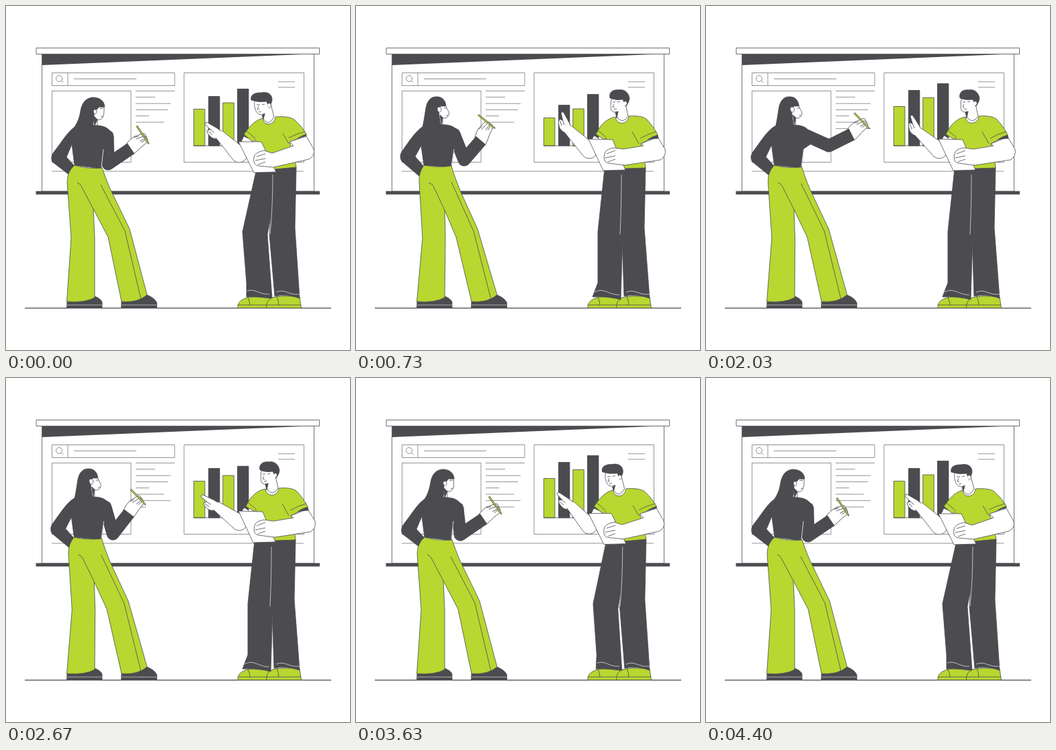
An HTML page with a canvas that plays this animation: 512x512 px, repeating every 4730 ms.

```html
<!DOCTYPE html>
<html lang="en">
<head>
<meta charset="utf-8">
<title>Presentation</title>
<style>
html, body { margin: 0; width: 100%; height: 100%; overflow: hidden; background: #fff; }
canvas { display: block; width: 100vw; height: 100vh; }
</style>
</head>
<body>
<canvas id="stage" width="512" height="512"></canvas>
<script>
const ctx = document.getElementById('stage').getContext('2d');
const LOOP = 4730, END = 4400;
const DARK = '#4b4b50', GREEN = '#b8d730', WHITE = '#fff';
const NUMBER = /-?[\d.]+/g;

const clamp = v => Math.max(0, Math.min(1, v));
const ease = v => { v = clamp(v); return v * v * (3 - 2 * v); };
const lerp = (a, b, w) => a + (b - a) * w;
const radians = degrees => degrees * Math.PI / 180;

// Each key is [time, ...values]; values ease from one key to the next.
function at(keys, t) {
  let i = 0;
  while (i < keys.length - 2 && t >= keys[i + 1][0]) i++;
  const a = keys[i], b = keys[i + 1], w = ease((t - a[0]) / (b[0] - a[0]));
  return a.slice(1).map((v, n) => lerp(v, b[n + 1], w));
}

// Blends two path strings of the same structure.
function blend(a, b, w) {
  const ends = b.match(NUMBER);
  let i = 0;
  return a.replace(NUMBER, v => lerp(+v, +ends[i++], w).toFixed(3));
}

function draw(path, fill, stroke = DARK, width = 0.8) {
  const p = new Path2D(path);
  if (fill) { ctx.fillStyle = fill; ctx.fill(p); }
  if (stroke) { ctx.strokeStyle = stroke; ctx.lineWidth = width; ctx.stroke(p); }
}

const line = (x1, y1, x2, y2) => draw(`M${x1} ${y1}L${x2} ${y2}`, null);
const box = (x1, y1, x2, y2, fill) => draw(`M${x1} ${y1}H${x2}V${y2}H${x1}Z`, fill);

function inFrame(x, y, degrees, paint) {
  ctx.save();
  ctx.translate(x, y);
  ctx.rotate(radians(degrees));
  paint();
  ctx.restore();
}

const BARS = [
  { x: 279.5, mid: 153.5, low: 166.5, high: 149.5, drop: 540, fill: GREEN },
  { x: 301.5, mid: 134.5, low: 147.5, high: 125.5, drop: 530, fill: DARK },
  { x: 322.8, mid: 144, low: 153, high: 136.5, drop: 430, fill: GREEN },
  { x: 344.5, mid: 123.5, low: 131.5, high: 115.5, drop: 300, fill: DARK }
];

const WRITER = [ // elbow, wrist, hand angle, pen angle
  [0, 152, 235, 186, 212, -39, 56],
  [30, 152, 235, 186, 212, -39, 56],
  [640, 161, 229, 186, 200, -65, 39],
  [1270, 161, 229, 185, 199, -65, 38],
  [2030, 183, 208, 217, 191, -43, 46],
  [2640, 159, 232, 183, 201, -51, 46],
  [3180, 178, 217, 209, 200, -43, 48],
  [3700, 154, 234, 189, 210, -39, 55],
  [4270, 152, 235, 186, 212, -39, 56]
];

const POINTER = [ // fingertip, hand angle
  [0, 297, 174, -140],
  [30, 297, 174, -140],
  [700, 307, 158, -108],
  [1270, 292, 167, -135],
  [1980, 306, 163, -112],
  [2670, 291, 175, -145],
  [3600, 300, 171, -137],
  [4400, 297, 174, -140]
];

const LEAN = [[30, 0], [680, 1], [1270, 1], [2030, 0.45], [2670, 0.65], [3750, 0]];

function penTip([, , x, y, angle]) {
  const a = radians(angle + 25);
  return [x + 27.5 * Math.cos(a), y + 27.5 * Math.sin(a)];
}

function screen(t) {
  box(53.5, 71, 458.5, 276, WHITE);
  draw('M54 72H440L54 88Z', DARK, null);
  box(45, 62.5, 466.5, 71.5, WHITE);
  draw('M44.5 275.6H467V280.5H44.5Z', DARK, null);
  ctx.globalAlpha = 0.75;
  box(68.5, 99.5, 251, 118.5);
  line(92, 99.5, 92, 118.5);
  draw('M83.5 108A4.5 4.5 0 1 1 74.5 108A4.5 4.5 0 1 1 83.5 108M82.3 111.2L85.5 114', null);
  line(101, 108.5, 194, 108.5);
  box(68.5, 126.5, 186, 232.5);
  box(265, 99.5, 443.5, 232.5);
  line(68, 246, 443, 246);
  line(405, 112.8, 430, 112.8);
  line(405, 121, 430, 121);

  const [tipX] = penTip(at(WRITER, t));
  const written = (from, to, end) => t < from ? 193 : t < to ? Math.min(end, tipX) : end;
  const ends = [251, 222, 245, 241, 213, 235.5, written(1270, 2030, 245), written(2670, 3180, 235.5)];
  const rows = [126.5, 135.7, 145.2, 154.5, 163.6, 173, 182.4, 192];
  rows.forEach((y, i) => { if (ends[i] > 193) line(193, y, ends[i], y); });
  ctx.globalAlpha = 1;

  BARS.forEach((b, i) => {
    const [top] = at([
      [0, b.mid], [b.drop, b.mid], [b.drop + 190, b.low], [850 + 20 * i, b.low],
      [1200, b.mid], [1270, b.mid], [1420, b.high], [2030, b.high],
      [2100 + 30 * i, b.mid], [2200, b.mid]
    ], t % 2200);
    box(b.x, top, b.x + 16.5, 208, b.fill);
  });
  line(279, 208, 361, 208);
}

function womanHead(turn) {
  const part = (a, b, ...style) => draw(blend(a, b, turn), ...style);
  part('M147 150C146 140 138 136 129 136C118 137 113 145 111 156C109 168 106 176 96 188L128 182L133 160L138 150Z',
       'M134 149C133 139 127 135 120 135C111 135 106 141 104 152C102 164 101 174 97 188L125 182L128 162L126 149Z', DARK);
  part('M139 150L146 151C146 155 146 160 145 163C144 168 140 170 136 169L136 180L131 180L131 158Z',
       'M126 149L134 149C135 153 140 159 138 162C136 167 132 168 129 166L129 179L126 179L123 157Z', WHITE);
  part('M136 169L131 164L132 178Z', 'M129 166L125 162L127 177Z', DARK);
  part('M135 157C135 153 130 153 130 157C131 162 135 161 135 157', 'M127 154C127 149 120 149 121 154C122 160 127 159 127 154', WHITE);
  part('M139 152L144 153M141 165L144 164', 'M131 152L135 152M134 164L137 162', null);
}

function woman(t, turn) {
  const [lean] = at(LEAN, Math.max(t, 30));
  const part = (a, b, ...style) => draw(blend(a, b, lean), ...style);
  draw('M91 439Q116 442 132 432Q142 436 143 441V449.5H90.5Z', DARK);
  draw('M172 439Q196 442 210 430Q222 435 224.5 442V449.5H171.5Z', DARK);
  draw('M91 445H143M172 445H224', null, '#ddd', 0.7);

  inFrame(8 * Math.max(0, turn - lean), 0, 0, () => womanHead(turn));
  part('M104 179C112 176 125 177 138 178C148 179 155 183 158 192L158 205L145 213L142 242L102 237L98 206L90 225L102 238L95 252L69 232Q66 225 70 219C85 200 92 186 104 179Z',
       'M102 178C110 175 122 176 135 177C145 178 150 183 154 190L156 204L146 212L142 240L101 237L97 208L88 224L101 239L95 254L68 231Q64 224 68 217C80 200 90 184 102 178Z', DARK);
  part('M102 237Q122 243 143 241C147 252 151 263 154 270L184 332L210 430Q196 442 172 440L152 344L130 302L132 345L132 434Q118 442 90.5 440L97 345L91 262Q91 246 102 237Z',
       'M101 237Q122 241 142 238C146 252 150 262 156 277L181 332L210 430Q196 442 172 440L149 344L132 304L133 345L132 434Q118 442 90.5 440L99 345L94 262Q93 248 101 237Z', GREEN);
  part('M141 266L177 335L201 437M106 263Q110 264 112 268L130 302',
       'M142 262L175 335L201 437M108 263Q113 264 115 268L132 304', null);

  const arm = at(WRITER, t);
  const [ex, ey, wx, wy, angle, penAngle] = arm;
  inFrame(wx, wy, angle, () => {
    draw('M-3 -9Q8 -12 15 -10.5L28 -6Q31 -4 29 -1L28 5Q25 9 20 8L12 8Q6 9 -3 9Z', WHITE);
    draw('M15 -6L27 -2Q30 0 27 2L17 0M18 3L27 4M14 -10L20 -7', null);
  });
  inFrame(...penTip(arm), penAngle, () => draw('M-32 -1H-2L0 0L-2 1H-32Z', GREEN));

  const sx = lerp(151, 146, lean), sy = lerp(194, 191, lean);
  draw(`M${sx} ${sy}L${ex} ${ey}L${wx} ${wy}`, null, DARK, 19);
  ctx.beginPath();
  ctx.arc(sx, sy, 9.5, 0, 2 * Math.PI);
  ctx.fillStyle = DARK;
  ctx.fill();
  part('M145 213L142 240', 'M146 213L142 238', null, WHITE);
}

function pointingArm(t, turn) {
  const [tx, ty, angle] = at(POINTER, t);
  const a = radians(angle);
  const wx = tx - 26 * Math.cos(a), wy = ty - 26 * Math.sin(a);
  const ex = 347, ey = lerp(221, 215, turn);
  const dir = Math.atan2(wy - ey, wx - ex);
  const nx = -Math.sin(dir), ny = Math.cos(dir);

  draw(`M362 198L${ex + 4} ${ey}`, null, DARK, 19);
  draw(`M362 198L${ex + 4} ${ey}`, null, WHITE, 17.5);
  inFrame(wx, wy, angle, () => {
    draw('M-4 6L8 5L25 2Q28 0 25 -2L14 -3L17 -6Q17 -9 13 -10L7 -11Q1 -11 -4 -6Z', WHITE);
    draw('M14 -3L7 -3M15 -7L7 -7', null);
  });
  ctx.beginPath();
  ctx.moveTo(wx + nx * 7, wy + ny * 7);
  ctx.arc(ex, ey, 12, dir + Math.PI / 2, dir - Math.PI / 2);
  ctx.lineTo(wx - nx * 7, wy - ny * 7);
  ctx.fillStyle = WHITE;
  ctx.strokeStyle = DARK;
  ctx.lineWidth = 0.8;
  ctx.fill();
  ctx.stroke();
}

function man(t, turn) {
  const part = (a, b, ...style) => draw(blend(a, b, turn), ...style);
  draw('M345 449.5Q344 440 354 436Q362 431 376 433L394 435Q398 440 391 449.5Z', GREEN);
  draw('M387.5 449.5Q387 438 396 434Q410 430 437 433L439.5 449.5Z', GREEN);
  draw('M345 445H439M360 434Q363 439 363 445M403 433Q406 438 406 445', null);

  part('M373 242L352 336L358 412L358 433Q376 432 396 435L389 340L394 315L396 244Z',
       'M370 242L360 336L360 412L352 433Q376 432 394 437L396 372L396 320L396 244Z', DARK);
  part('M392 242L394 315L392 340L400 432Q418 428 437 435L430 330L432 240Z',
       'M394 242L396 315L396 345L399 432Q418 428 437 435L429 330L431 240Z', DARK);
  part('M397 251Q397 300 393 340', 'M395 251Q395 300 393 340', null, '#ddd');
  part('M359 424C372 420 376 430 392 429M402 426C415 420 420 431 437 429',
       'M355 426C368 418 376 430 392 430M402 426C415 420 420 431 437 429', null, '#ddd');

  pointingArm(t, turn);

  part('M382 167C384 180 400 178 401 165C412 164 424 165 429 169C437 176 444 185 447 191L422 203L427 215L432 240L400 243L376 215L371 199L367 202L354 191C362 180 370 170 382 167Z',
       'M386 165C388 178 405 177 406 164C416 163 427 164 432 168C439 175 446 185 449 192L424 205L428 217L431 241L400 242L376 213L372 196L370 199L357 191C362 182 368 169 386 165Z', GREEN);
  part('M421 196Q433 190 445 187M412 190L421 205M358 186L371 197', 'M423 197Q435 190 447 187M411 187L421 205M361 186L372 195', null);

  part('M370 141C369 150 371 157 376 161Q380 163 385 160L383 168Q391 180 399 165L395 150L393 138L380 136Z',
       'M380 139C379 146 379 152 380 155Q384 160 390 157L388 165Q397 177 405 164L402 150L403 138L390 134Z', WHITE);
  part('M385 160L381 163L383 168Z', 'M390 157L386 158L388 167Z', DARK);
  part('M365 140C363 131 372 129 380 129C390 127 396 132 396 139C396 145 393 146 391 151L388 142Q376 144 365 140Z',
       'M378 137C376 128 383 124 391 125C400 123 406 130 407 137C407 142 404 146 402 149L397 139Q387 141 378 137Z', DARK);
  part('M389 146C394 142 397 149 391 152', 'M398 143C403 139 406 146 400 149', WHITE);
  part('M373 147L378 147M381 147L385 146M376 149L374 154L377 154M376 158L380 157',
       'M382 143L386 143M389 143L393 142M384 146L382 150L385 151M384 154L388 153', null);

  part('M346 202L380 202L402 247L369 248Z', 'M346 198L382 199L401 244L368 245Z', WHITE);
  part('M422 202L428 208L396 219L384 215Q370 218 369 225Q367 237 376 238L398 240L451 228Q461 222 458 213L447 194Z',
       'M424 205L428 208L398 213L384 211Q371 213 370 220Q367 233 376 234L400 237L453 229Q462 224 460 213L449 195Z', WHITE);
  part('M434 197Q440 193 447 191L447 193Q440 195 434 197Z', 'M434 199Q441 194 449 192L450 197Q442 197 434 199Z', DARK);
  part('M386 220L373 224M386 227L371 230M386 232L375 236', 'M386 215L373 220M386 223L371 226M386 228L375 232', null);
}

function frame(now) {
  const t = Math.min(now % LOOP, END);
  const turn = ease((t - 30) / 650) - ease((t - 3200) / 550);
  ctx.lineJoin = 'round';
  ctx.fillStyle = WHITE;
  ctx.fillRect(0, 0, 512, 512);
  screen(t);
  draw('M28 449.7H484', null, DARK, 1.2);
  woman(t, turn);
  man(t, turn);
}

function tick() {
  frame(performance.now());
  requestAnimationFrame(tick);
}
tick();
</script>
</body>
</html>
```
